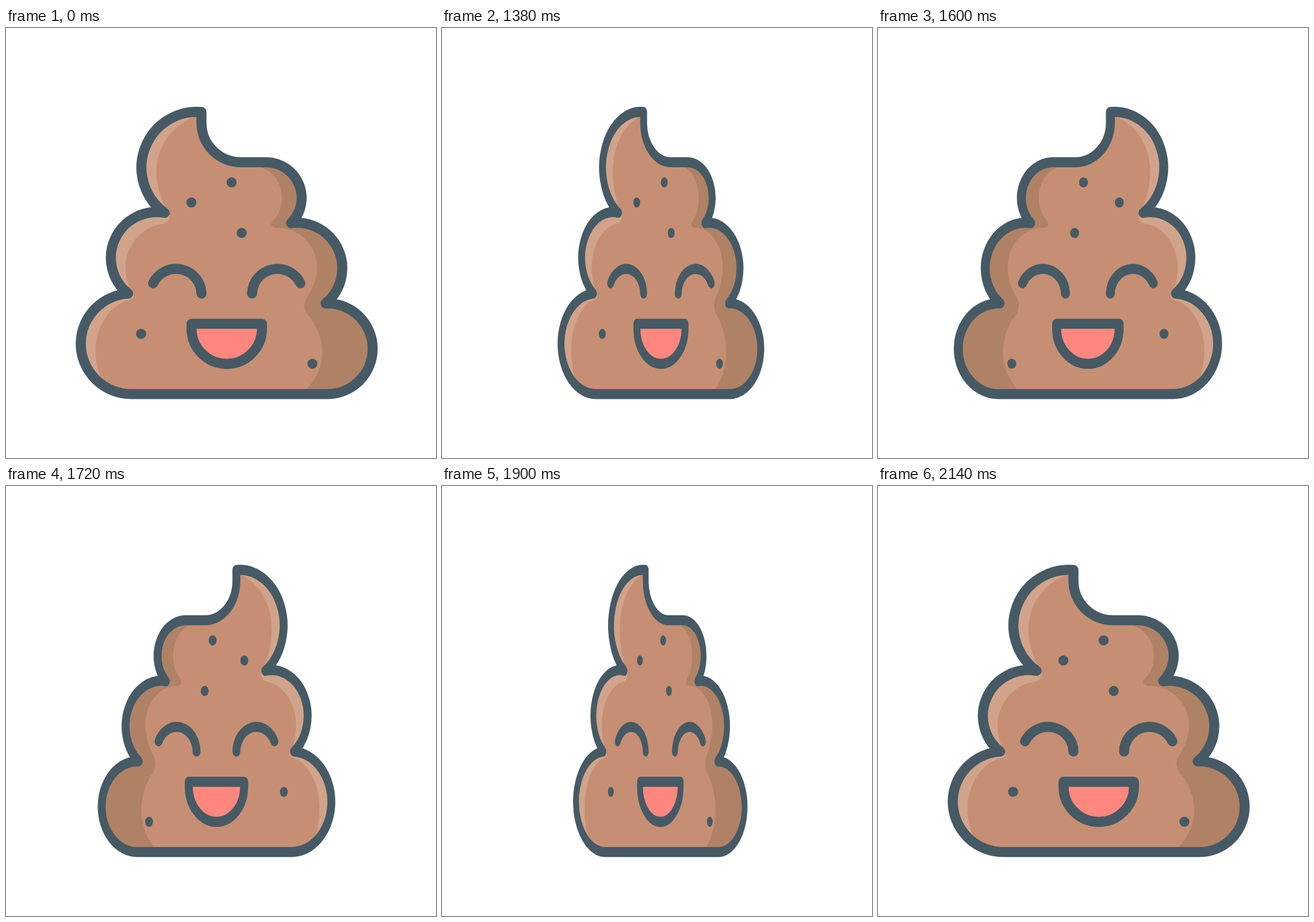
Animation, 748 px wide and 748 px high, one loop 2.98 s. Source, as an HTML page:

```html
<!DOCTYPE html>
<html lang="en">
<head>
<meta charset="utf-8">
<title>Spinning swirl</title>
<style>
  html, body { margin: 0; width: 100%; height: 100%; overflow: hidden; background: #fff; }
  svg { display: block; width: 100%; height: 100%; }
  .line { fill: none; stroke: #455a64; stroke-width: 17.5; stroke-linecap: round; stroke-linejoin: round; }
</style>
</head>
<body>
<svg viewBox="0 0 748 748">
  <defs>
    <path id="body" d="M340 146A97 97 0 0 0 276 321.5A79.5 79.5 0 0 0 212.5 462A88 88 0 0 0 130 549A88 88 0 0 0 218 636.8
      H560A79 79 0 0 0 637.8 558A79 79 0 0 0 556 479A79 79 0 0 0 496 339.5A62 62 0 0 0 454 233.6H409A69 68.6 0 0 1 340 165Z"/>
    <clipPath id="inside"><use href="#body"/></clipPath>
  </defs>
  <g id="swirl">
    <use href="#body" fill="#c68f73"/>
    <g clip-path="url(#inside)">
      <path fill="#d1a38a" d="M334 152C285 170 262 208 262 250C262 278 270 300 284 324Q288 338 270 341C235 346 208 380 208 415
        C208 435 213 452 222 466Q223 471 215 473C180 481 156 520 156 560C156 590 164 610 178 632H100V130Z"/>
      <path fill="#b08265" d="M430 238C462 244 480 268 480 296C480 313 474 326 464 335Q457 344 468 347.5H474C512 349 541 379 541 416
        C541 436 534 452 524 468Q514 482 524 498C540 515 550 540 550 564C550 590 538 615 518 632V640H700V200H430Z"/>
    </g>
    <use href="#body" class="line"/>
    <path class="line" d="M392.5 268.5h0M322.5 303.5h0M410 356.5h0M235 532h0M533 584h0"/>
    <path class="line" d="M256 444A44.2 44.2 0 0 1 340 462M428 462A44.2 44.2 0 0 1 512 444"/>
    <path class="line" style="fill:#ff877d" d="M322.8 514.4H445.2V523A61.2 61.2 0 0 1 322.8 523Z"/>
  </g>
</svg>
<script>
  const LOOP = 2980, STEP = 20, MIDDLE = 1650, SPIN = 985, AXIS = 374;
  const swirl = document.getElementById('swirl');

  // One full turn about the vertical axis, eased in and out.
  function draw(now) {
    const t = Math.floor(now % LOOP / STEP) * STEP;
    const p = Math.min(1, Math.max(0, (t - MIDDLE) / SPIN + 0.5));
    const scale = Math.cos(2 * Math.PI * p * p * (3 - 2 * p));
    swirl.setAttribute('transform', `translate(${AXIS} 0) scale(${scale} 1) translate(${-AXIS} 0)`);
  }

  function tick() {
    draw(performance.now());
    requestAnimationFrame(tick);
  }
  tick();
</script>
</body>
</html>
```
